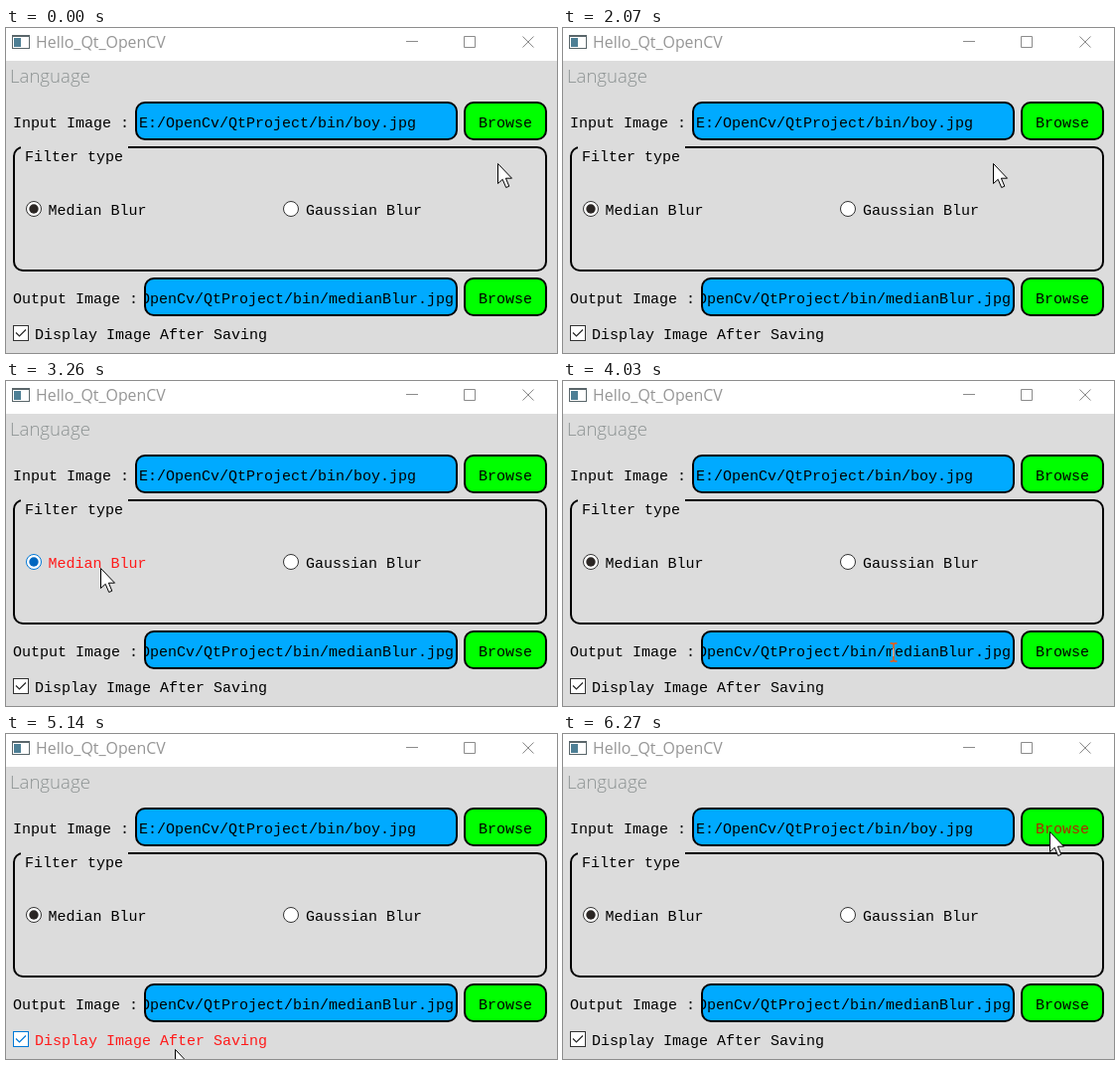
These frames come from a looping animation (555x327 px, 6340 ms). An HTML page:

```html
<!DOCTYPE html>
<html lang="en">
<head>
<meta charset="utf-8">
<title>Filter window</title>
<style>
  html, body { margin: 0; width: 100%; height: 100%; overflow: hidden; background: #dcdcdc; }
  svg { display: block; width: 555px; height: 327px; }
  text { font: 15px "Liberation Mono", monospace; fill: #000; }
  .title { font: 15.9px "Open Sans", "Noto Sans", sans-serif; fill: #969696; }
  .menu { font: 300 18.6px "Open Sans", "Noto Sans", sans-serif; fill: #8c9292; }
  .box { stroke: #000; stroke-width: 2; }
  .field { fill: #00aaff; }
  .button rect { fill: #0f0; }
  .chrome { fill: none; stroke: #8c8c8c; }
  .mark { fill: #fff; stroke: #333; }
  .dot { fill: #2b2624; }
  .tick { fill: none; stroke: #262626; stroke-width: 1.2; }
  .hot text { fill: #ff1a1a; }
  .hot.button text { fill: #b02800; }
  .hot .mark, .hot .tick { stroke: #0078d7; }
  .hot .dot { fill: #0067c0; }
  #beam { mix-blend-mode: difference; fill: none; stroke: #fff; stroke-width: 1.5; }
</style>
</head>
<body>
<svg viewBox="0 0 555 327" xmlns="http://www.w3.org/2000/svg">
  <defs><clipPath id="clip"><rect x="141" y="253" width="312" height="35"/></clipPath></defs>
  <rect width="555" height="327" fill="#dcdcdc"/>
  <rect width="555" height="33" fill="#fff"/>

  <rect x="6.5" y="7.5" width="17" height="13" fill="#fff" stroke="#5a666a"/>
  <rect x="6" y="7" width="18" height="2" fill="#5a666a"/>
  <rect x="8" y="10" width="7" height="9" fill="#4d7f95"/>
  <text class="title" x="30" y="20">Hello_Qt_OpenCV</text>
  <path class="chrome" d="M403 13.5H415M461.5 8.5H472.5V19.5H461.5ZM520.5 8.5L531.5 19.5M531.5 8.5L520.5 19.5"/>
  <text class="menu" x="4" y="55">Language</text>

  <text x="7" y="100">Input Image :</text>
  <rect class="box field" x="131" y="75" width="323" height="37" rx="9"/>
  <text x="134" y="100">E:/OpenCv/QtProject/bin/boy.jpg</text>
  <g class="button hover">
    <rect class="box" x="462" y="75" width="82" height="37" rx="9"/>
    <text x="476" y="100">Browse</text>
  </g>

  <rect class="box" x="8" y="120" width="536" height="124" rx="9" fill="none"/>
  <rect x="15" y="117" width="108" height="22" fill="#dcdcdc"/>
  <text x="19" y="134">Filter type</text>
  <g class="hover">
    <circle class="mark" cx="28" cy="182" r="7.5"/>
    <circle class="dot" cx="28" cy="182" r="4.7"/>
    <text x="42.5" y="188">Median Blur</text>
  </g>
  <g class="hover">
    <circle class="mark" cx="287" cy="182" r="7.5"/>
    <text x="302" y="188">Gaussian Blur</text>
  </g>

  <text x="7" y="277">Output Image :</text>
  <rect class="box field" x="140" y="252" width="314" height="37" rx="9"/>
  <g clip-path="url(#clip)"><text x="109" y="277">E:/OpenCv/QtProject/bin/medianBlur.jpg</text></g>
  <g class="button hover">
    <rect class="box" x="462" y="252" width="82" height="37" rx="9"/>
    <text x="476" y="277">Browse</text>
  </g>

  <g class="hover">
    <rect class="mark" x="7.5" y="299.5" width="15" height="15"/>
    <path class="tick" d="M10 306.5L13.5 310L20 303.5"/>
    <text x="29" y="313">Display Image After Saving</text>
  </g>

  <path id="beam" d="M-3.5 -9H-1L0 -8L1 -9H3.5M-3.5 9H-1L0 8L1 9H3.5M0 -8V8"/>
  <path id="arrow" fill="#fff" stroke="#000" d="M.5 .5V20.5L5.2 16.3L8.7 24.5L11.8 23.2L8.4 15.2H14.5Z"/>
</svg>
<script>
  const LOOP = 6340;
  const home = [495, 136];

  // Pointer moves: start, end, x, y; it rests in between
  const moves = [
    [20, 250, 495, 81],
    [530, 690, 494, 84],
    [1170, 1380, 374, 91],
    [1380, 1580, 515, 91],
    [1770, 2420, 339, 188],
    [2680, 3050, 131, 188],
    [3070, 3260, 95, 188],
    [3620, 4030, 332, 273],
    [4030, 4170, 538, 272],
    [4580, 5140, 170, 317],
    [5530, 5740, 355, 280],
    [5740, 6270, 490, 98]
  ];

  const all = selector => [...document.querySelectorAll(selector)];
  const areasOf = selector => all(selector).map(el => ({ el, box: el.getBBox() }));
  const targets = areasOf(".hover");
  const fields = areasOf(".field");
  const beam = document.getElementById("beam");
  const arrow = document.getElementById("arrow");

  const inside = ({ box }, x, y) =>
    x >= box.x && x <= box.x + box.width && y >= box.y && y <= box.y + box.height;

  function pointerAt(t) {
    let [x, y] = home;
    for (const [start, end, toX, toY] of moves) {
      const k = Math.min(1, Math.max(0, (t - start) / (end - start)));
      x += (toX - x) * k;
      y += (toY - y) * k;
    }
    return [Math.round(x), Math.round(y)];
  }

  function place(shape, x, y, shown) {
    shape.setAttribute("transform", `translate(${x} ${y})`);
    shape.setAttribute("visibility", shown ? "visible" : "hidden");
  }

  function draw(t) {
    const [x, y] = pointerAt(t);
    for (const target of targets) target.el.classList.toggle("hot", inside(target, x, y));
    const editing = fields.some(field => inside(field, x, y));
    place(beam, x, y, editing);
    place(arrow, x, y, !editing);
  }

  const start = performance.now();
  function tick() {
    draw((performance.now() - start) % LOOP);
    requestAnimationFrame(tick);
  }
  tick();
</script>
</body>
</html>
```
